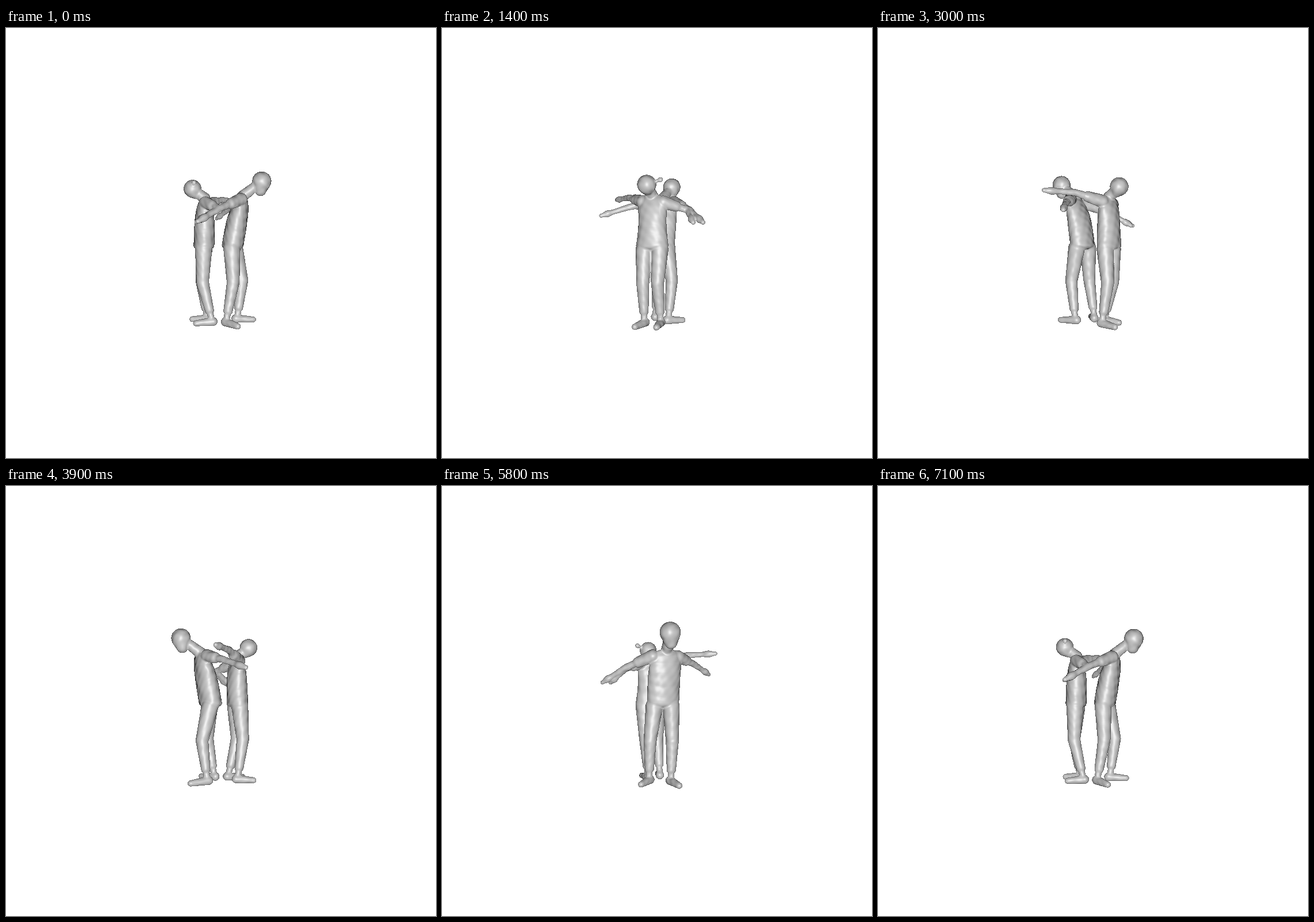
These frames come from a looping animation (748 px wide and 748 px high, 7.2 s). An HTML page with a canvas:

```html
<!DOCTYPE html>
<html lang="en">
<head>
<meta charset="utf-8">
<title>Turntable</title>
<style>
  html, body { margin: 0; width: 100%; height: 100%; overflow: hidden; background: #fff; }
  canvas { display: block; }
</style>
</head>
<body>
<canvas id="stage" width="748" height="748"></canvas>
<script>
const CENTER = 374, CAMERA = 648, GROUND = -141;
const LEFT = 254, TOP = 226, W = 244, H = 312;
const FRAMES = 72, FRAME_MS = 100;

// Joints are [x, height, z] around the turning axis, toes are [x, z].
const man = {
  spine: [[20, -3, -3], [27, 38, -2], [37, 82, -3]], depth: 19, width: 28, dip: 0,
  head: [70, 107.5, 4], jaw: [68, 92, 2], skull: 16.5,
  legs: [
    { joints: [[18, -8, 12], [20, -66, 20], [9, -128, 18]], toe: [27, 38] },
    { joints: [[24, -8, -16], [37, -66, -13], [29, -128, -14]], toe: [57, -17] }
  ],
  arms: [
    [[33, 74, 20], [1, 57, 57], [-35, 33, 89]],
    [[31, 75, -25], [15, 66, -62], [-9, 50, -105]]
  ]
};
const woman = {
  spine: [[-30, -4, 2], [-29, 36, 2], [-29, 78, 2]], depth: 18, width: 28, dip: 4,
  head: [-50, 95, 0], jaw: [-44, 86, 0], skull: 15.5, bun: [-46, 102, 22],
  legs: [
    { joints: [[-30, -10, -12], [-35, -66, -13], [-26, -128, -14]], toe: [-52, -20] },
    { joints: [[-30, -10, 15], [-32, -66, 12], [-17, -128, 12]], toe: [-43, 14] }
  ],
  arms: [
    [[-27, 70, -16], [2, 82, -55], [34, 83, -95]],
    [[-27, 68, 20], [-4, 56, 55], [-38, 33, 74]]
  ]
};

const mix = (p, q, t) => p.map((v, i) => v + (q[i] - v) * t);
const bump = (t, at, size) => Math.exp(-(((t - at) / size) ** 2));

// Sweeps an ellipsoid along joints; radii(t) gives [x, z, height] or one radius.
function sweep(joints, radii) {
  const steps = 90, spans = joints.length - 1;
  return Array.from({ length: steps + 1 }, (_, k) => {
    const t = k / steps, i = Math.min(spans - 1, Math.floor(t * spans));
    const r = radii(t);
    return [...mix(joints[i], joints[i + 1], t * spans - i), ...(r.length ? r : [r, r, r])];
  });
}

const legRadius = t => t < 0.9 ? 14.5 - 7.5 * t : 5.5;
const armRadius = t => (t < 0.27 ? 11 - 8 * t : 7.5 - 4 * t) + 2 * bump(t, 0.88, 0.06);

function leg({ joints, toe }) {
  const [x, , z] = joints[2];
  const heel = mix([x, z], toe, -0.12);
  const onGround = ([px, pz], r) => [px, GROUND + r, pz];
  return [
    ...sweep(joints, legRadius),
    ...sweep([onGround(heel, 7.5), onGround(toe, 5)], t => 7.5 - 2.5 * t)
  ];
}

function person({ spine, depth, width, dip, head, jaw, skull, bun, legs, arms }) {
  const torso = t => {
    const a = depth * (1 - 0.6 * t ** 4);
    const b = (width - dip * Math.sin(Math.PI * t)) * (1 - 0.4 * t ** 10);
    return [a, b, Math.min(a, b) / 2];
  };
  return [
    ...sweep(spine, torso),
    ...sweep([spine[2], mix(spine[2], head, 0.75)], t => 10 - 2 * t),
    ...sweep([head, jaw], t => skull - 6.5 * t),
    ...(bun ? sweep([head, bun], t => 2.5 + 1.5 * bump(t, 1, 0.1)) : []),
    ...legs.flatMap(leg),
    ...arms.flatMap(joints => sweep(joints, armRadius))
  ];
}
const blobs = [...person(man), ...person(woman)];

const ctx = document.getElementById('stage').getContext('2d');
const image = ctx.createImageData(W, H);
const depth = new Float32Array(W * H);
const normX = new Float32Array(W * H);
const normY = new Float32Array(W * H);

function drawBlob([x, y, z, a, b, h], cos, sin) {
  const vx = x * cos + z * sin, vz = z * cos - x * sin;
  const scale = CAMERA / (CAMERA - vz);
  const cx = CENTER + vx * scale - LEFT, cy = CENTER - y * scale - TOP;
  const ia = 1 / (a * a), ib = 1 / (b * b), ih = 1 / (h * h);
  // Quadratic form of the turned ellipsoid
  const A = cos * cos * ia + sin * sin * ib;
  const B = cos * sin * (ib - ia);
  const C = sin * sin * ia + cos * cos * ib;
  const rx = a * b * Math.sqrt(C) * scale, ry = h * scale;
  const x0 = Math.max(0, Math.ceil(cx - rx)), x1 = Math.min(W - 1, cx + rx);
  const y0 = Math.max(0, Math.ceil(cy - ry)), y1 = Math.min(H - 1, cy + ry);
  for (let py = y0; py <= y1; py++) {
    const dy = (cy - py) / scale;
    for (let px = x0; px <= x1; px++) {
      const dx = (px - cx) / scale;
      const disc = B * B * dx * dx - C * (A * dx * dx + dy * dy * ih - 1);
      if (disc < 0) continue;
      const dz = (Math.sqrt(disc) - B * dx) / C, i = py * W + px;
      if (vz + dz <= depth[i]) continue;
      depth[i] = vz + dz;
      const nx = A * dx + B * dz, ny = dy * ih, nz = B * dx + C * dz;
      const len = Math.sqrt(nx * nx + ny * ny + nz * nz);
      normX[i] = nx / len;
      normY[i] = ny / len;
    }
  }
}

// Mean normal of the nearby surface, so that joints melt together
function smoothNormal(i) {
  let nx = 0, ny = 0, count = 0;
  for (let dy = -2; dy <= 2; dy++) {
    for (let dx = -2; dx <= 2; dx++) {
      const j = i + dy * W + dx;
      if (!(Math.abs(depth[j] - depth[i]) < 6)) continue;
      nx += normX[j];
      ny += normY[j];
      count++;
    }
  }
  return [nx / count, ny / count];
}

function shade(i, cos, sin) {
  const vz = depth[i];
  if (vz === -Infinity) return 255;
  const k = (CAMERA - vz) / CAMERA;
  const vx = (i % W + LEFT - CENTER) * k;
  const y = (CENTER - TOP - Math.floor(i / W)) * k;
  const x = vx * cos - vz * sin, z = vx * sin + vz * cos;
  let [nx, ny] = smoothNormal(i);
  // Gentle cloth ripples fixed to the body
  nx += 0.07 * Math.sin(y * 0.23 + x * 0.4) * Math.sin(z * 0.35 + y * 0.11);
  ny += 0.07 * Math.sin(y * 0.41 + z * 0.2) * Math.cos(x * 0.3 - z * 0.17);
  const nz = Math.sqrt(Math.max(0, 1 - nx * nx - ny * ny));
  const rim = [1, -1, W, -W].some(d => depth[i + d] < vz - 12);
  return (45 + 157 * nz ** 0.8 + 40 * nz ** 40) * (rim ? 0.68 : 1);
}

function render(frame) {
  const angle = frame / FRAMES * 2 * Math.PI;
  const cos = Math.cos(angle), sin = Math.sin(angle);
  depth.fill(-Infinity);
  for (const blob of blobs) drawBlob(blob, cos, sin);
  for (let i = 0; i < W * H; i++) {
    const v = shade(i, cos, sin);
    image.data.set([v, v, v, 255], i * 4);
  }
  ctx.putImageData(image, LEFT, TOP);
}

let shown = -1;
function tick() {
  const frame = Math.floor(performance.now() / FRAME_MS) % FRAMES;
  if (frame !== shown) render(shown = frame);
  requestAnimationFrame(tick);
}
tick();
</script>
</body>
</html>
```
